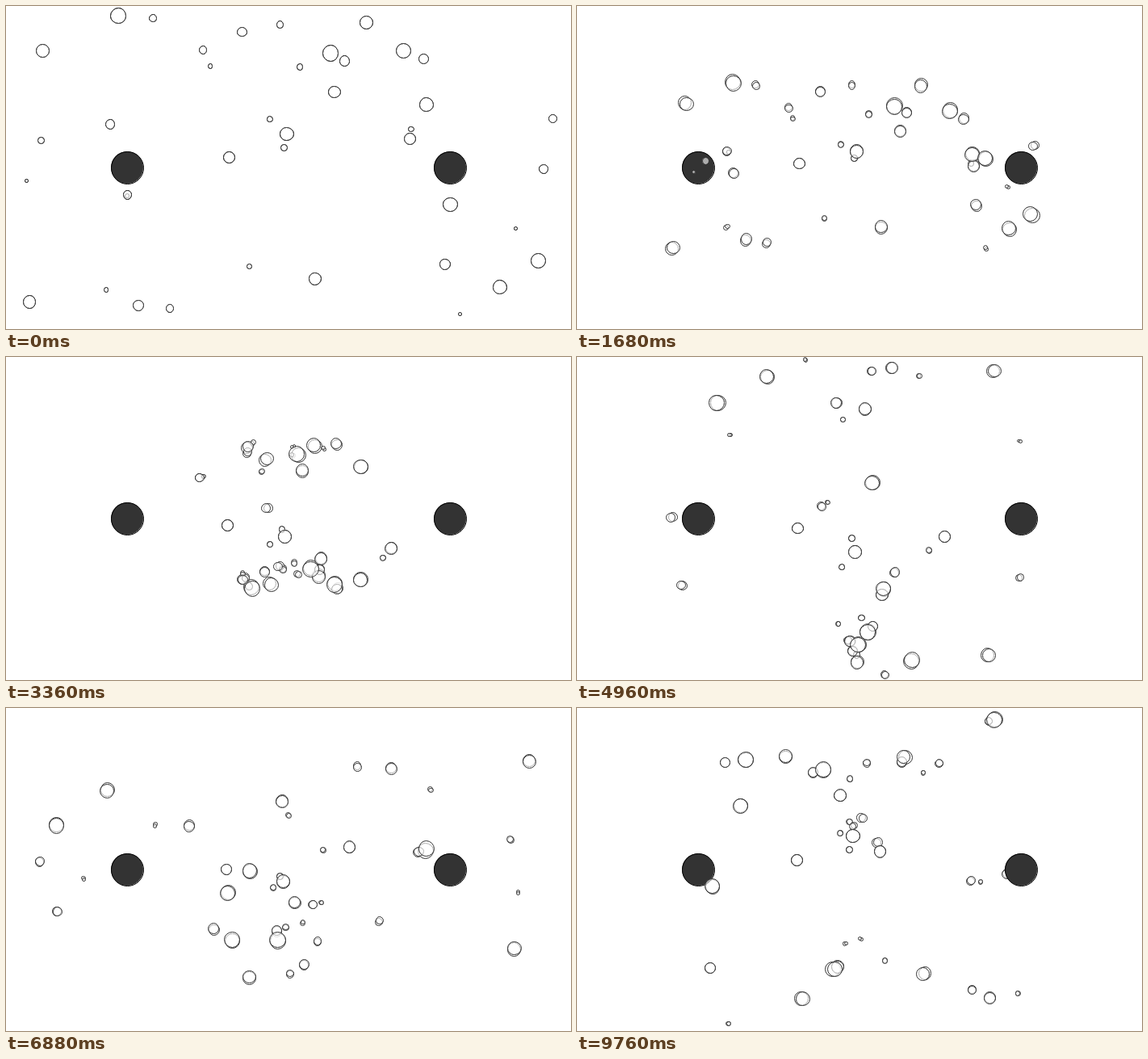
Write an HTML page with a canvas that moves like this. It is 700 px wide and 400 px high and loops after 9800 ms.

```html
<!DOCTYPE html>
<html>
<head>
<meta charset="utf-8">
<style>
  html, body { margin: 0; width: 100%; height: 100%; overflow: hidden; background: #fff; }
  canvas { display: block; width: 700px; height: 400px; }
</style>
</head>
<body>
<canvas id="stage" width="700" height="400"></canvas>
<script>
const ctx = document.getElementById('stage').getContext('2d');
const WIDTH = 700, HEIGHT = 400;
const FRAME_MS = 40, FRAMES = 245, PULL = 20;
const attractors = [{ x: 150, y: 200, r: 20 }, { x: 550, y: 200, r: 20 }];

// Where each bubble is let go, smallest first; all else follows from the pull.
const releases = [
  [25.5, 216.3], [631.4, 275.4], [562.4, 381.4], [150, 235.5], [253.3, 74.3],
  [124, 351.5], [301.5, 322.5], [502, 152.4], [327, 140], [364.3, 75.3],
  [344.5, 175.4], [43.3, 166.5], [339.5, 23.2], [182.4, 15.2], [244.3, 54.4],
  [203, 374.3], [150.3, 234], [677.5, 139.6], [666.5, 201.6], [129, 146.3],
  [292.4, 32], [419.6, 68], [517.5, 65.6], [543.6, 320], [276.6, 187.4],
  [164, 371], [500.2, 164.5], [407, 106.5], [382.6, 337.6], [29, 366.5],
  [446.4, 20.2], [348, 158.2], [45.4, 55.4], [611.6, 348.5], [521, 122],
  [550.6, 246], [659.5, 315.3], [492.5, 55.6], [139.3, 12.2], [402.3, 58.3]
];
const radius = rank => 1.9 + 0.2 * rank;
const clamp = (v, low, high) => Math.min(high, Math.max(low, v));

let bubbles, drawnFrame;

function reset() {
  bubbles = releases.map(([x, y], rank) =>
    ({ x, y, r: radius(rank), vx: 0, vy: 0, passes: [] }));
  drawnFrame = -1;
}

function attract(b, a) {
  const dx = a.x - b.x, dy = a.y - b.y;
  const dist = Math.hypot(dx, dy) || 1;
  const force = PULL / clamp(dist, 5, 25) ** 2;
  b.vx += force * dx / dist;
  b.vy += force * dy / dist;
}

function move(b) {
  b.x += b.vx;
  b.y += b.vy;
  const x = clamp(b.x, b.r, WIDTH - b.r), y = clamp(b.y, b.r, HEIGHT - b.r);
  if (x !== b.x) b.vx *= -1;
  if (y !== b.y) b.vy *= -1;
  b.x = x;
  b.y = y;
}

// One frame holds two moves: towards the left body, then towards the right one.
function advance() {
  for (const b of bubbles) {
    b.passes = attractors.map(a => {
      attract(b, a);
      move(b);
      return { x: b.x, y: b.y, r: b.r };
    });
  }
  drawnFrame++;
}

const snap = v => Math.floor(v) + 0.5;

// Fill at the exact place, outline snapped to pixel centres.
function disc({ x, y, r }, fill, line) {
  ctx.fillStyle = fill;
  ctx.strokeStyle = line;
  ctx.beginPath();
  ctx.arc(x, y, r, 0, Math.PI * 2);
  ctx.fill();

  const cx = snap(x), cy = snap(y);
  const right = snap(x + r) - cx, left = cx - snap(x - r);
  const down = snap(y + r) - cy, up = cy - snap(y - r);
  const quarter = Math.PI / 2;
  ctx.beginPath();
  [[right, down], [left, down], [left, up], [right, up]].forEach(([rx, ry], i) =>
    ctx.ellipse(cx, cy, rx, ry, 0, i * quarter, (i + 1) * quarter));
  ctx.closePath();
  ctx.stroke();
}

function draw() {
  ctx.fillStyle = '#fff';
  ctx.fillRect(0, 0, WIDTH, HEIGHT);
  attractors.forEach((a, i) => {
    for (const b of bubbles) disc(b.passes[i], 'rgba(255,255,255,0.6)', '#333');
    disc(a, '#333', '#000');
  });
}

function show(ms) {
  const frame = Math.floor(ms / FRAME_MS) % FRAMES;
  if (frame === drawnFrame) return;
  if (frame < drawnFrame) reset();
  while (drawnFrame < frame) advance();
  draw();
}

const began = performance.now();
function tick() {
  show(performance.now() - began);
  requestAnimationFrame(tick);
}
reset();
tick();
</script>
</body>
</html>
```
